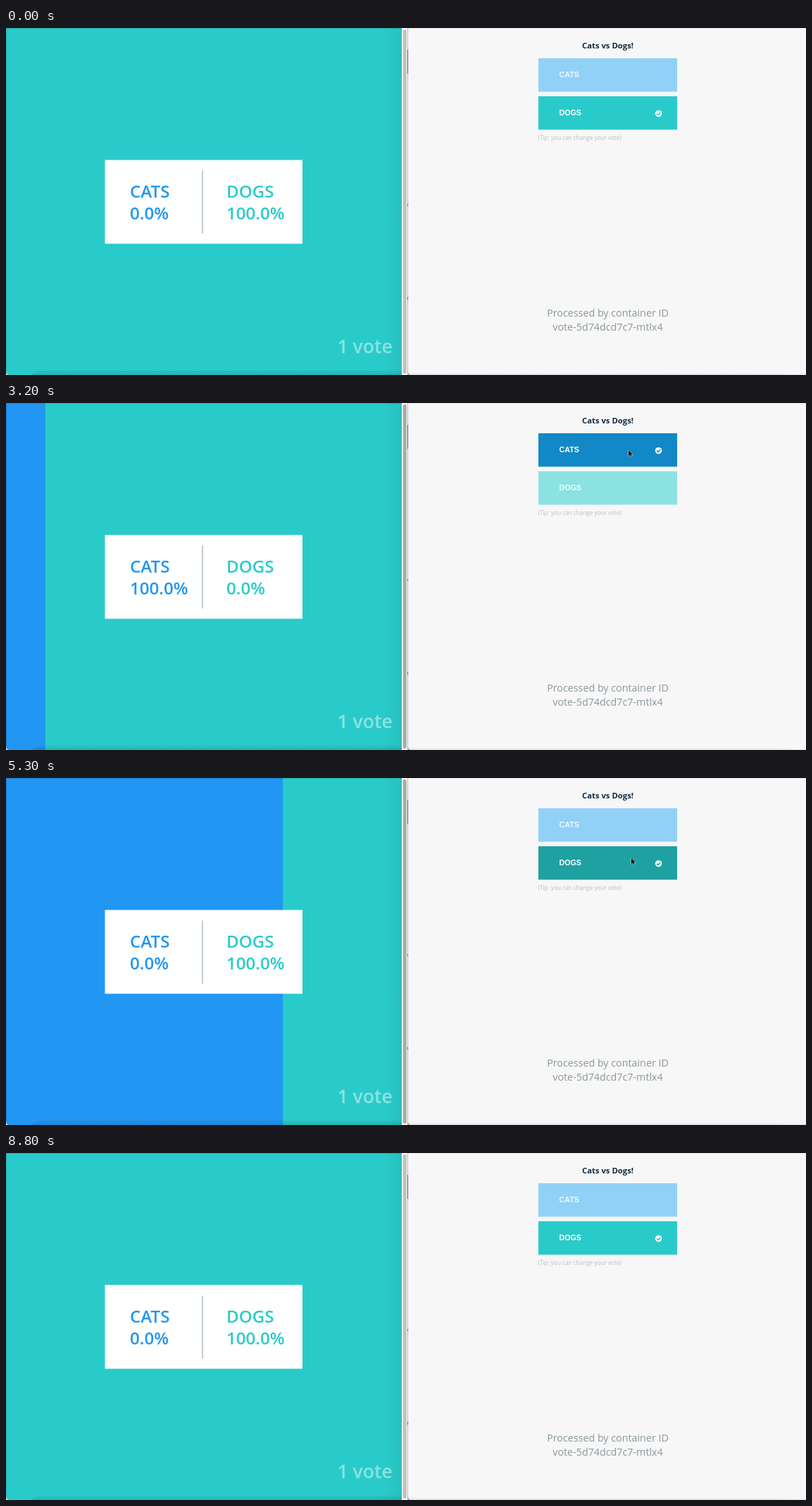
Recreate the animation shown at these times as an HTML page. Size 1136x493 px, loop 9.43 s.

```html
<!DOCTYPE html>
<html lang="en">
<head>
<meta charset="utf-8">
<title>Cats vs Dogs!</title>
<style>
  html, body { margin: 0; width: 100%; height: 100%; overflow: hidden; background: #f7f7f7; }
  svg { display: block; width: 100vw; height: 100vh; }
  text { font-family: "Open Sans", sans-serif; }
  .stat { font-size: 24.1px; font-weight: 600; }
  .choice text { font: bold 10.7px "Liberation Sans", Arial, sans-serif; fill: #fff; }
  .mid { text-anchor: middle; }
  .cats { fill: #2196f0; }
  .dogs { fill: #29cbca; }
</style>
</head>
<body>
<svg viewBox="0 0 1136 493">
  <defs>
    <linearGradient id="foot" x1="0" y1="0" x2="0" y2="1">
      <stop offset="0" stop-color="#000" stop-opacity="0"/>
      <stop offset="1" stop-color="#000" stop-opacity=".12"/>
    </linearGradient>
    <linearGradient id="side">
      <stop offset="0" stop-color="#000" stop-opacity="0"/>
      <stop offset="1" stop-color="#000" stop-opacity=".05"/>
    </linearGradient>
  </defs>

  <rect width="1136" height="493" fill="#f7f7f7"/>

  <!-- results window -->
  <rect class="dogs" width="562" height="493"/>
  <rect id="bar" height="493" fill="#2196f3"/>
  <rect x="535" width="27" height="493" fill="url(#side)"/>
  <path d="M36 493Q44 486 58 485H562V493Z" fill="url(#foot)"/>
  <path d="M0 .5H562M.5 0V493" stroke="#000" stroke-opacity=".14" fill="none"/>
  <path d="M0 487Q0 493 6 493H0Z" fill="#ddd"/>
  <rect x="140.5" y="187.5" width="280.5" height="119" fill="#fff"/>
  <path d="M279 202.500V292" stroke="#a9babc" stroke-width="1.4"/>
  <g class="stat">
    <text class="cats" x="176" y="240.500">CATS</text>
    <text class="cats" x="176" y="271.500" id="catPct"></text>
    <text class="dogs" x="313" y="240.500">DOGS</text>
    <text class="dogs" x="313" y="271.500" id="dogPct"></text>
  </g>
  <text x="549" y="461.500" text-anchor="end" font-size="26.700" font-weight="600" fill="#fff" fill-opacity=".46">1 vote</text>

  <!-- scrollbar and window edge -->
  <rect x="562" width="8" height="493" fill="#f8f8f8"/>
  <rect id="thumb" x="563.7" y="2" width="5" height="489" rx="2.5"/>
  <path d="M570.5 0V493" stroke="#bdbdbd"/>
  <path d="M570.5 31V65M570.5 250V253M570.5 382V386" stroke="#555"/>
  <path d="M570 487Q571 493 577 493H570Z" fill="#aaa"/>

  <!-- voting window -->
  <path d="M571 .5H1136" stroke="#e4e4e4"/>
  <path d="M571 493V487Q574 490 600 490H1090Q1108 490 1114 493Z" fill="url(#foot)" opacity=".4"/>
  <path d="M576 492.500H1136" stroke="#dcdcdc"/>
  <text class="mid" x="854.500" y="29" font-size="11.300" font-weight="700" fill="#12293d">Cats vs Dogs!</text>
  <g id="choices"></g>
  <text x="755.500" y="159" font-size="8.200" fill="#b6bec3">(Tip: you can change your vote)</text>
  <g class="mid" font-size="14.300" fill="#8a989c">
    <text x="854.500" y="410">Processed by container ID</text>
    <text x="854.500" y="429.500">vote-5d74dcd7c7-mtlx4</text>
  </g>

  <path id="cursor" d="M0 0V8.400L2 6.600 3.300 9.600 4.600 9 3.300 6.100H6Z" fill="#000" stroke="#fff" stroke-width=".9" paint-order="stroke"/>
</svg>
<script>
const LOOP = 9430, STEP = 100;
const $ = id => document.getElementById(id);

// colours: idle, idle + hover, chosen, chosen + hover
const choices = [
  { name: 'CATS', y: 43, fills: ['#92d1f6', '#8ebfdf', '#1ba9fa', '#1388c6'] },
  { name: 'DOGS', y: 97, fills: ['#8be2e0', '#8acfcc', '#29cbca', '#20a1a1'] }
];

$('choices').innerHTML = choices.map(c => `<g class="choice" id="${c.name}">
  <rect x="756" y="${c.y}" width="197" height="47.500"/>
  <text x="785.500" y="${c.y + 27.3}">${c.name}</text>
  <g class="check"><circle cx="926.600" cy="${c.y + 24.6}" r="4.700" fill="#fff"/>
  <path d="M924 ${c.y + 24.6}l2 2 3.400-3.500" fill="none" stroke-width="1.500"/></g></g>`).join('');

// pointer stops: time, x, y
const enter = [[800, 149, 130], [1700, 905, 190], [2300, 884, 67],
  [3700, 884, 67], [4100, 888, 115], [4400, 888, 114],
  [7400, 888, 114], [7600, 235, 150]];

function pointer(t) {
  if (t < 800 || t > 7600) return null;
  const i = Math.max(1, enter.findIndex(p => p[0] >= t));
  const [t0, x0, y0] = enter[i - 1], [t1, x1, y1] = enter[i];
  const k = (t - t0) / (t1 - t0);
  return [x0 + (x1 - x0) * k, y0 + (y1 - y0) * k];
}

// CSS ease-in-out, cubic-bezier(.42, 0, .58, 1)
function easeInOut(p) {
  if (p <= 0) return 0;
  if (p >= 1) return 1;
  let lo = 0, hi = 1;
  for (let i = 0; i < 20; i++) {
    const s = (lo + hi) / 2, r = 1 - s;
    if (1.26 * r * r * s + 1.74 * r * s * s + s * s * s < p) lo = s; else hi = s;
  }
  return lo * lo * (3 - 2 * lo);
}

function draw(time) {
  const t = Math.floor(time / STEP) * STEP;

  const share = easeInOut((t - 3090) / 500) - easeInOut((t - 5110) / 500);
  $('bar').setAttribute('width', 562 * share);
  const catsLead = t >= 3200 && t < 5200;
  $('catPct').textContent = catsLead ? '100.0%' : '0.0%';
  $('dogPct').textContent = catsLead ? '0.0%' : '100.0%';

  const pos = pointer(t);
  $('cursor').style.display = pos ? '' : 'none';
  if (pos) $('cursor').setAttribute('transform', `translate(${pos})`);
  $('thumb').setAttribute('fill', t >= 1300 && t < 8800 ? '#aaa' : '#c1c1c1');

  const chosen = t >= 2900 && t < 4400 ? 'CATS' : 'DOGS';
  for (const { name, y, fills } of choices) {
    const over = pos && pos[0] > 756 && pos[0] < 953 && pos[1] >= y && pos[1] < y + 48;
    const on = name === chosen;
    const fill = fills[(on ? 2 : 0) + (over ? 1 : 0)];
    const g = $(name);
    g.querySelector('rect').setAttribute('fill', fill);
    g.querySelector('text').setAttribute('fill-opacity', on ? 1 : .85);
    g.querySelector('.check').style.display = on ? '' : 'none';
    g.querySelector('path').setAttribute('stroke', fill);
  }
}

const start = performance.now();
(function tick() {
  draw((performance.now() - start) % LOOP);
  requestAnimationFrame(tick);
})();
</script>
</body>
</html>
```
